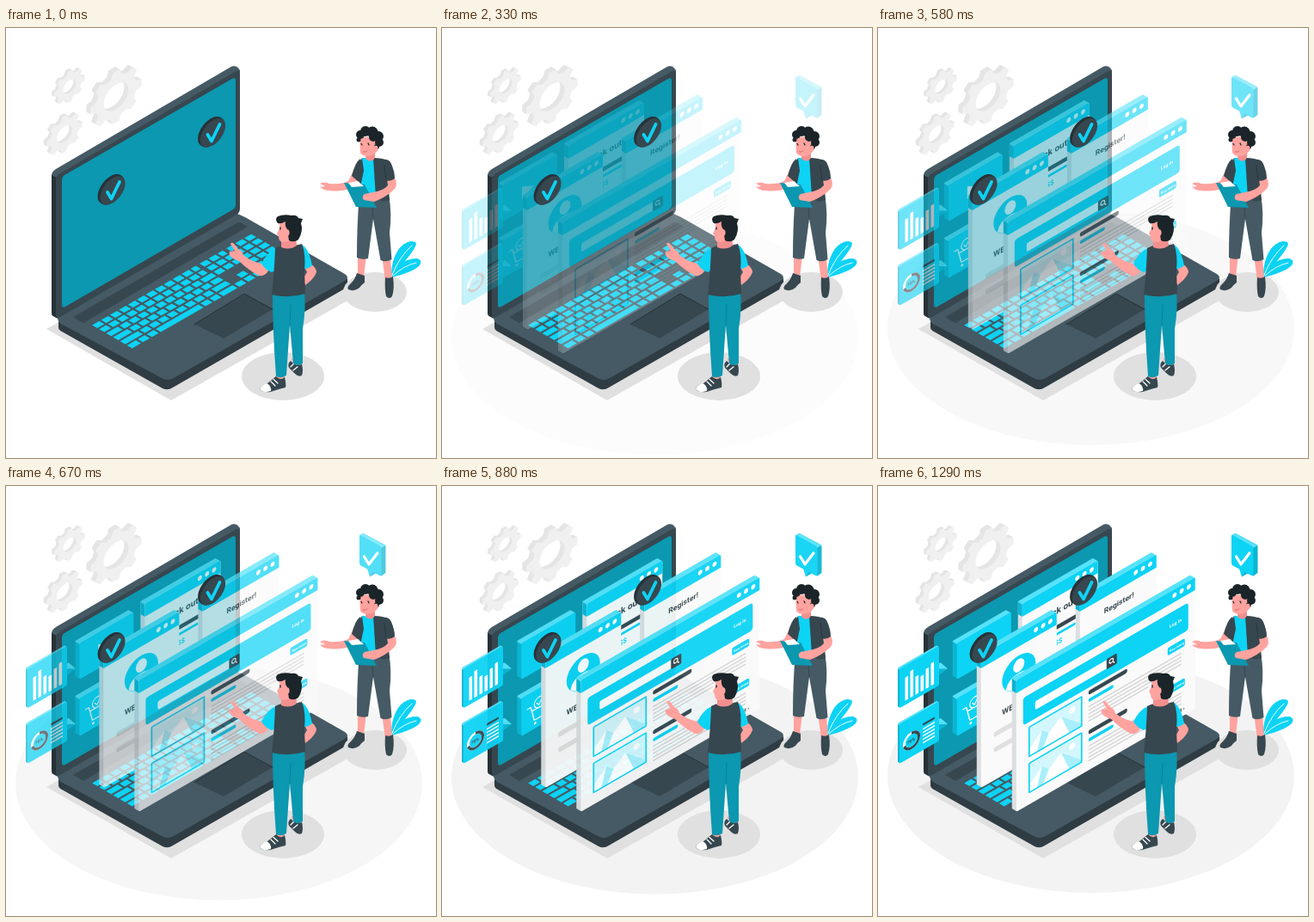
These frames come from a looping animation (500 px wide and 500 px high, 1330 ms). An HTML page:

```html
<!DOCTYPE html>
<html lang="en">
<head>
<meta charset="utf-8">
<style>
html, body { margin: 0; width: 100%; height: 100%; overflow: hidden; background: #fff; }
svg { display: block; width: 100vw; height: 100vh; }
text { font-family: Roboto, "Open Sans", sans-serif; font-weight: 700; }
</style>
</head>
<body>
<svg id="stage" viewBox="0 0 500 500"></svg>
<script>
const C = {
  cyan: '#0dd3f5', pale: '#56e2f9', deep: '#0bb5d2', teal: '#0b98b0',
  ink: '#263238', dark: '#37474f', slate: '#455a64', grey: '#e0e0e0',
  paper: '#fafafa', skin: '#ffa39f', blush: '#f28f8f', hair: '#1b2529'
};

// Markup helpers
const path = (d, fill, extra = '') => `<path d="${d}" fill="${fill}" ${extra}/>`;
const line = (d, stroke, w, extra = '') =>
  `<path d="${d}" fill="none" stroke="${stroke}" stroke-width="${w}" stroke-linecap="round" stroke-linejoin="round" ${extra}/>`;
const rect = (x, y, w, h, fill, r = 0, extra = '') =>
  `<rect x="${x}" y="${y}" width="${w}" height="${h}" rx="${r}" fill="${fill}" ${extra}/>`;
const oval = (x, y, rx, ry, fill) => `<ellipse cx="${x}" cy="${y}" rx="${rx}" ry="${ry}" fill="${fill}"/>`;
const dot = (x, y, r, fill) => oval(x, y, r, r, fill);
const label = (x, y, size, fill, s) => `<text x="${x}" y="${y}" font-size="${size}" fill="${fill}">${s}</text>`;
const iso = (x, y, body) => `<g transform="matrix(1 -.577 0 1 ${x} ${y})">${body}</g>`;
const group = (cls, body) => `<g class="${cls}">${body}</g>`;
const range = n => [...Array(n).keys()];

function gear(x, y, r, hole) {
  const pts = range(32).map(i => {
    const a = (i + (i % 2 ? .2 : -.2) - .4) * Math.PI / 16, k = i % 4 < 2 ? r : r * .8;
    return `${(k * Math.cos(a)).toFixed(1)} ${(k * Math.sin(a)).toFixed(1)}`;
  });
  const d = `M${pts.join('L')}ZM${hole} 0A${hole} ${hole} 0 1 0 ${-hole} 0A${hole} ${hole} 0 1 0 ${hole} 0Z`;
  const layer = (k, fill) => iso(x - k, y - k * .577, path(d, fill, 'fill-rule="evenodd"'));
  const depth = r / 6;
  return [1, .75, .5, .25].map(k => layer(k * depth, '#e5e5e5')).join('') + layer(0, '#f0f0f0');
}

// Solid slab: front face with a visible top and left side
function slab(x, y, w, h, d, front, top, side) {
  const k = d * 1.155;
  return iso(x, y,
    path(`M0 1L${-d} ${1 - k}V${h - k - 1}L0 ${h - 1}L3 ${h - 4}V1Z`, side) +
    path(`M0 1L${-d} ${1 - k}Q${-d} ${-k} ${1 - d} ${-k}H${w - d - 1}L${w} 1Z`, top) +
    rect(0, 0, w, h, front, 2));
}

function panel(x, y, w, h, body) {
  return slab(x, y, w, h, 5, C.paper, C.pale, '#dcdfe1') + iso(x, y,
    path('M0 1L-5 -4.8V9L0 15Z', C.deep) +
    path(`M0 15V2Q0 0 2 0H${w - 2}Q${w} 0 ${w} 2V15Z`, C.cyan) +
    [24, 15.7, 7.4].map(k => oval(w - k, 7, 2.5, 2.7, '#fff')).join('') + body);
}

function badge(x, y) {
  return iso(x - 2.4, y - 1.8, dot(0, 0, 15, C.ink)) + iso(x - 1, y - .8, dot(0, 0, 15, C.ink)) +
    iso(x, y, dot(0, 0, 14.6, C.dark)) +
    line(`M${x - 6} ${y + 2}L${x - 1.5} ${y + 9.5}L${x + 8} ${y - 10}`, C.cyan, 3.8);
}

function keyboard() {
  const key = (c, r, w) => {
    const at = (u, v) => `${(98 + 10.4 * u + 8.1 * v).toFixed(1)} ${(345.5 - 5.95 * u + 4.7 * v).toFixed(1)}`;
    const a = c + .11, b = c + w - .11, t = r + .13, s = r + .87;
    return path(`M${at(a, t)}L${at(b, t)}L${at(b, s)}L${at(a, s)}Z`, C.cyan);
  };
  const rows = range(6).map(r => {
    let out = '', c = 0;
    while (c < 18) {
      let w = 1;
      if (c === 0) w = [1, 1, 1.5, 1.8, 2.2, 1.2][r];
      if (r === 5 && c > 3 && c < 4) w = 5;
      if (c < 12 && c + w > 11) w = 12 - c;
      const gap = c >= 12 && c < 15 && (r === 3 || (r === 4 && c !== 13));
      if (!gap) out += key(c, r, w - (c === 11 || c === 14 ? .2 : 0));
      c += w;
    }
    return out;
  });
  return rows.join('');
}

function laptop() {
  return path('M47 350L192 433L413 308L380 285L100 320Z', C.grey) +
    path('M61 341V348Q61 351 65 353L182 419Q188 422 194 418L394 303Q398 300 397 291L190 405Z', '#2f3c43') +
    path('M60 334L264 214Q272 217 278 220L394 286Q400 290 394 294L195 407Q188 411 181 407L64 344Q59 340 60 334Z', C.slate) +
    path('M78 336L268 227Q271 225 274 227L281 231L90 343Z', C.dark) + keyboard() +
    path('M219 344.500L277 309L310 327L253 361Z', C.dark) + line('M219 344.500L277 309L310 327', C.ink, 1) +
    path('M53 172Q53 167 58 164L261 45.500Q265 43 269 45.500L272 49L270 200L60 338L55 335Q53 334 53 331Z', C.slate) +
    path('M53 171L59 174V337L55 335Q53 334 53 331Z', C.ink) +
    path('M58 177Q58 172 63 169L267 50.500Q272 48 272 54V210Q272 215 268 217L64 335.500Q58 339 58 333Z', C.dark) +
    path('M65 176Q65 173 68 171L263 59Q267 57 267 61V206Q267 209 264 211L69 324Q65 326 65 322Z', C.teal);
}

const picture = v => rect(15, v, 61, 34, '#d3f7fd') +
  path(`M15 ${v + 34}V${v + 26}L30 ${v + 12}L38 ${v + 20}L52 ${v + 9}L76 ${v + 31}V${v + 34}Z`, '#fff') +
  path(`M30 ${v + 12}L38 ${v + 20}L31 ${v + 34}H24ZM52 ${v + 9}L76 ${v + 31}V${v + 34}H62Z`, '#a9effb') +
  dot(65, v + 9, 3.6, '#fff') + rect(15, v, 61, 34, 'none', .5, `stroke="${C.cyan}" stroke-width="1.7"`);

const article = v => rect(84, v, 45, 5, C.dark, 2) + rect(84, v + 9.5, 29, 4, C.cyan, 1.8) +
  range(5).map(i => rect(84, v + 18 + i * 4.2, i === 4 ? 70 : 108, 1.5, '#d2d2d2')).join('') +
  rect(176, v + 3.5, 20, 9, C.cyan, 2) + label(178, v + 9.8, 4, '#fff', 'See more');

// All windows share one group, so they fade as a single picture
function windows() {
  const box = (x, y, w, h) => slab(x, y, w, h, 5, C.cyan, C.pale, C.deep);
  const cart = line('M7 17H11L15 34H26L29 22H13', '#fff', 1.3) + dot(16, 38, 1.5, '#fff') + dot(25, 38, 1.5, '#fff') +
    `<circle cx="21" cy="16" r="6" fill="${C.cyan}" stroke="#fff" stroke-width="1.2"/>` + line('M18 16L20.500 19L24 13', '#fff', 1.2);
  return group('slide', box(94, 183, 63, 42) + iso(94, 183, path('M22 14L36 21L22 29Z', '#fff')) +
    box(94, 247, 63, 44) + iso(94, 247, cart) +
    panel(170, 137, 88, 154,
      label(17, 35, 10, C.dark, 'Check out') + rect(12, 48, 58, 5, C.dark, 1) + rect(12, 57, 50, 3, C.cyan, 1) +
      label(38, 71, 7.5, C.cyan, '$$') + rect(12, 80, 62, 4, C.grey, 1)) +
    panel(237, 131, 89, 154,
      label(28, 34, 8.6, C.dark, 'Register!') + [52, 70, 88].map(v => rect(14, v, 61, 9, '#ececec', 2)).join('')) +
    panel(122, 197, 88, 154,
      dot(44, 45, 19.5, C.cyan) + oval(44, 37, 6.5, 7.5, '#fff') + path('M29 57Q31 46 44 46Q57 46 59 57Q53 64 44 64Q35 64 29 57Z', '#fff') +
      label(24.5, 84, 9, C.dark, 'WELCOME') + rect(15, 98, 58, 6, C.grey, 2) + rect(15, 116, 58, 6, C.grey, 2)) +
    panel(163, 226, 208, 153,
      rect(8, 25, 192, 32, C.cyan, 3) + rect(22, 37, 86, 10, '#fff', 2) + rect(105, 36, 12, 12, C.dark, 1.5) +
      `<circle cx="110.500" cy="41" r="2.300" fill="none" stroke="#fff" stroke-width="1.200"/>` + line('M112.500 43L114 45', '#fff', 1.2) +
      label(178, 42, 5.2, '#fff', 'Log in') + picture(63) + picture(105) + article(60.5) + article(106.5) +
      label(180, 147, 6, C.dark, 'Next ›')));
}

function cards() {
  const card = (y, body) => path(`M69 ${y - 6}L81 ${y}L69 ${y + 9}Z`, C.deep) + path(`M69 ${y - 6}L73 ${y - 7}L81 ${y}L71 ${y}Z`, C.pale) +
    slab(25, y, 46, 46, 2, C.cyan, C.pale, C.deep) + iso(25, y, body);
  const bars = [27, 31, 21, 18, 23, 26].map((h, i) => rect(6.5 + i * 6, 41 - h, 3.6, h, '#fff', .6)).join('');
  const ring = `<circle cx="14" cy="27" r="8.600" fill="none" stroke="#fff" stroke-width="3"/>` +
    `<circle cx="14" cy="27" r="8.600" fill="none" stroke="${C.dark}" stroke-width="3" stroke-dasharray="38 54" transform="rotate(-90 14 27)"/>`;
  const rows = rect(27, 15, 14, 2.4, C.dark, 1) +
    range(5).map(i => rect(27, 20.5 + i * 4, 14, 1.6, '#fff')).join('');
  return group('fade', card(212.5, bars) + card(277, ring + label(8.8, 29, 5, C.dark, '70%') + rows));
}

const bubble = () => group('fade',
  path('M411 57.500L415.500 55L440 68Q442 69 441.500 71V101L436 105Z', C.deep) +
  path('M411 57.500L415.500 55L441.500 69L436 72Z', C.pale) +
  path('M420 96L423 105.500L431 100Z', C.cyan) + path('M423 105.500L427.500 103L431 101L426.500 99.500Z', C.deep) +
  path('M411 59Q411 56.500 413 57.500L434.500 69.500Q436.500 71 436.500 73V102.500Q436.500 105 434 104L412.500 92.500Q411 91.500 411 89.500Z', C.cyan) +
  line('M416.500 82L422 91L432 78', '#fff', 3.2));

function woman() {
  return oval(429, 307, 37, 23, C.grey) +
    path('M448 288C448 266 458 249 472 248Q479 248 476 254Q470 266 448 288Z', C.cyan) +
    path('M448 290Q457 268 478 268Q485 270 481 276Q473 284 448 290Z', C.cyan) +
    line('M449 287Q458 265 472 253M450 288Q463 276 477 273', '#fff', .9) +
    path('M409 262L419 264L416 290L409 289ZM437 264L447 265L449 294L441 294Z', C.skin) +
    path('M408 285L417 288V296Q414 298 411 302Q405 307 398 304Q396 301 401 297Q406 292 408 285Z', C.dark) +
    path('M441 290Q446 292 450 289Q452 303 449 312Q446 316 442 312Q440 303 441 290Z', C.dark) +
    path('M411 192L445 194Q449 215 446 238L448.500 269Q442 273 435.500 270L427 222L421 268Q414 270 408 267Q408 228 411 192Z', C.slate) +
    line('M427 222L426 208', C.dark, 1) +
    path('M404 166L412 174Q409 182 403 186Q388 191 376 189Q368 189 365 184Q367 185 371 184L365 181Q370 178 376 181Q389 182 398 178Z', C.skin) +
    path('M412 152Q406 156 402 172L410 179L418 165Z', C.dark) +
    path('M414 151L430 151L434 194Q421 199 411 194Q413 170 414 151Z', C.cyan) +
    path('M427 151Q439 151 445 155Q449 163 451 174L444 178L446 200Q436 204 430 197Z', C.dark) +
    path('M414 151Q409 158 410 174L411 190L416 166Z', C.dark) +
    path('M419 141H429V151Q424 158 418 152Z', C.blush) +
    path('M412 127L430 126L434 138Q430 149 421 149Q414 149 412 145Q411 135 412 127Z', C.skin) +
    line('M413 134.500L414 136M421 134L422 136', C.hair, 1.3) + line('M415 144Q418 145 420 143', '#c9605f', .8) +
    [[412, 124, 5], [418, 120, 6], [426, 121, 6.5], [433, 126, 6], [434, 133, 5], [427, 127, 5], [410, 130, 2.5], [431, 138, 3]]
      .map(a => dot(...a, C.hair)).join('') + oval(430, 140, 2.5, 3.2, C.skin) +
    path('M393 180L417 182L431 209L407 208Z', C.teal) + path('M398 180L409 178L416 184L402 185Z', '#fff') +
    path('M443 176L452 174Q456 182 452 187Q442 197 428 202L416 200Q413 196 417 193L427 191Q439 189 444 183Z', C.skin) +
    path('M437 153Q446 152 448 158Q452 167 452 175Q447 179 441 177Z', C.dark) +
    line('M440 159L442 177', C.ink, .7);
}

function man() {
  return oval(322, 405, 48, 28, C.grey) +
    path('M332 384H343L344 394H334ZM315 402H324V411H315Z', C.skin) +
    path('M331 387Q336 393 344 391Q346 398 344 404Q340 406 336 402L329 395Q327 390 331 387Z', C.dark) +
    line('M331 394L335 390M334 398L339 394', '#fff', 1.3) +
    path('M314 405Q319 411 324 406Q326 414 325 418Q316 420 308 423Q298 424 295 420Q296 415 303 414Z', C.dark) +
    path('M295 420Q297 414 304 413.500Q309 417 308 422Q299 425 295 420Z', '#fff') +
    line('M308 411L313 416M311 408.500L316 413', '#fff', 1.3) +
    path('M310 307L347 306Q349 326 345 350L345 390Q339 394 334 390L330 345L326 404Q320 408 314 405Q310 352 310 307Z', C.teal) +
    line('M330 346L331 322', '#08829a', 1) +
    path('M346 276L354 274Q361 279 361 284Q358 292 348 299L345 292L350 284Z', C.skin) +
    path('M344 252Q352 256 356 276Q352 280 346 280Z', C.cyan) +
    path('M297 274L308 276L304 284Q300 289 294 288Q281 281 271 271Q262 268 260 264Q259 258 262 260L266 259L261 251Q263 248 266 252L270 257Q275 259 276 264Q284 271 297 274Z', C.skin) +
    path('M314 256Q304 260 297 274Q301 281 309 284L318 279Z', C.cyan) +
    line('M262 261L267 265M263 258L269 263', C.blush, .7) +
    path('M313 256Q321 251 331 254L344 251Q349 263 347 282L348 309Q329 315 309 310Q312 285 313 256Z', C.dark) +
    path('M320 240L337 240L338 253Q330 259 320 255Z', C.blush) +
    path('M318 224L334 223L336 240Q332 249 322 249Q317 249 317 242L315 239L318 233Z', C.skin) +
    line('M319 232V234', C.hair, 1.3) +
    path('M316 227Q312 222 316 219Q323 216 332 218Q338 217 340 221L345 222L343 227Q346 236 340 246Q335 250 329 247L327 234Q324 230 325 225Q320 228 316 227Z', C.hair) +
    oval(327, 238, 2.6, 3.8, C.skin);
}

const stage = document.getElementById('stage');
stage.innerHTML = group('floor', oval(247.5, 337, 236.5, 136, '#f3f3f3')) +
  gear(74, 68, 18, 7.5) + gear(68, 123.5, 21, 9) + gear(128, 80, 30, 14.5) +
  laptop() + windows() + badge(124, 189) + badge(240.5, 122) + cards() + bubble() + woman() + man();

const LOOP = 1330, FPS = 24, TRAVEL = 30;
const all = sel => [...stage.querySelectorAll(sel)];
const slides = all('.slide'), fades = all('.fade'), floor = all('.floor');
const move = (list, p, x, y) => list.forEach(g => {
  g.setAttribute('opacity', p);
  g.setAttribute('transform', `translate(${x} ${y})`);
});

function draw(ms) {
  // Steps at 24 per second, starts rounded to 10 ms
  const t = Math.floor((Math.floor(ms / 10) * 10 + 5) * FPS / 1000) / FPS;
  const s = Math.min(Math.max(t - .02, 0), 1), p = s * s * (3 - 2 * s);
  const drift = -2.2 * Math.pow(Math.max(0, t - 1) / .29, 1.5);
  move(slides, p, (p - 1) * TRAVEL + drift, 0);
  move(fades, p, 0, 0);
  move(floor, p, 0, (1 - p) * TRAVEL);
}

const start = performance.now();
function tick() {
  draw((performance.now() - start) % LOOP);
  requestAnimationFrame(tick);
}
tick();
</script>
</body>
</html>
```
